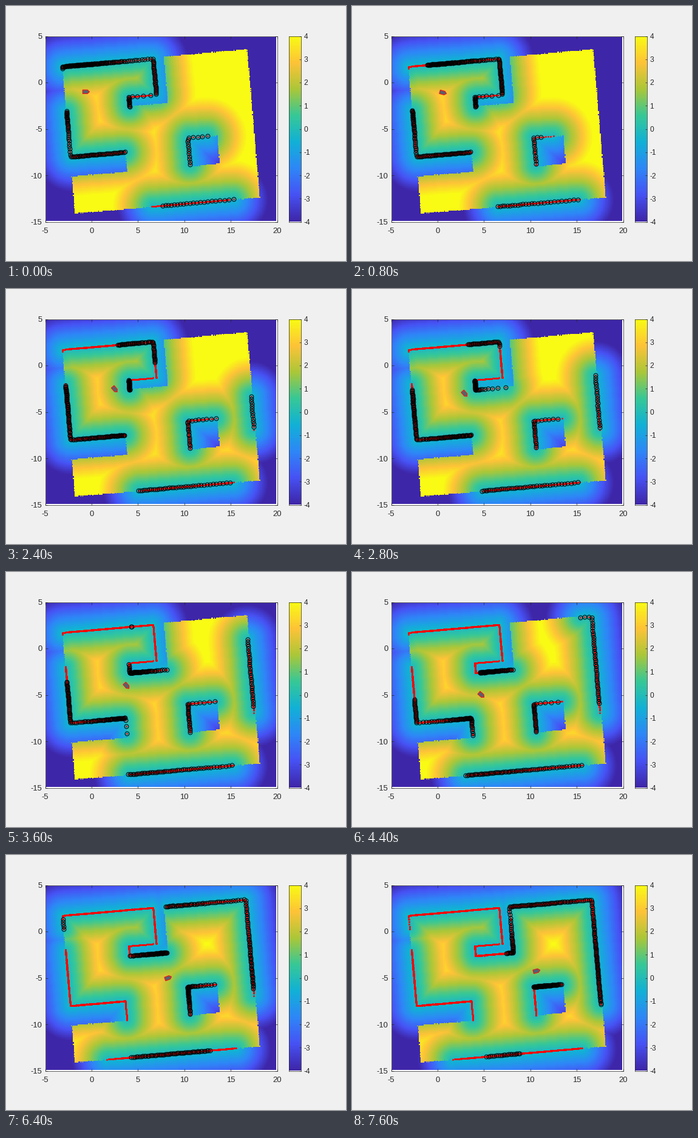
Write a matplotlib script that moves like this. It is 560x420 px and loops after 8000 ms.

```python
import numpy as np
import matplotlib.pyplot as plt
from matplotlib.animation import FuncAnimation
from matplotlib.colors import LinearSegmentedColormap
from matplotlib.path import Path

W, H, DPI = 560, 420, 100
PX = 72 / DPI  # points per pixel
FRAMES, INTERVAL = 20, 400
INK = "#262626"
CELL, MARGIN = .1, .1
LIMIT, INSET = 4, .25  # clipping of the field, thickness given to the walls
rng = np.random.default_rng(4)

plt.rcParams["font.family"] = "Liberation Sans"
plt.rcParams["axes.unicode_minus"] = False

PARULA = LinearSegmentedColormap.from_list("parula_like", [
    "#3e26a8", "#4752f4", "#2e87f7", "#12b1d6",
    "#37c897", "#abc739", "#fec338", "#f9fb15"])


def rotation(degrees):
    """Matrix that turns row vectors counterclockwise."""
    c, s = np.cos(np.radians(degrees)), np.sin(np.radians(degrees))
    return np.array([(c, s), (-s, c)])


TILT = rotation(5)


def rectilinear(us, vs):
    """Tilted outline of alternating horizontal and vertical sides."""
    corners = [(u, v) for pair in zip(us, np.roll(us, -1), vs)
               for u, v in ((pair[0], pair[2]), (pair[1], pair[2]))]
    return np.array(corners) @ TILT


# Floor plan for the field, and the slightly smaller one the laser measures
FREE = rectilinear([-3, 7, 4, 8, 17, -3, 3], [2, -2, -3, 2, -14, -10, -8]) + (0, .1)
BLOCK = rectilinear([10, 13], [-7, -10]) + (0, .1)
SHRINK = .99
WALLS = [SHRINK * rectilinear([-3, 6.9, 3.9, 8, 17, -3, 3],
                              [2, -1.93, -3, 2, -14, -10, -7.85]),
         SHRINK * rectilinear([9.9, 13], [-6.9, -10])]
STARTS = np.vstack(WALLS)
EDGES = np.vstack([np.roll(w, -1, 0) for w in WALLS]) - STARTS


def drive(start=(-.6, -1.0), steps=100):
    """Steer along a heading profile at rising speed; one pose per frame."""
    t = np.arange((FRAMES - 1) * steps + 1) / steps
    heading = np.interp(t, [.8, 4, 5.5, 9.5, 11, 14, 16, 19],
                        [0, -41, -49, -49, -41, 14.5, 20, 14.5])
    speed = .6 + .23 * (t / 17)**2
    a = np.radians(heading)
    velocity = speed[:, None] * np.column_stack([np.cos(a), np.sin(a)])
    travel = np.cumsum(velocity, axis=0) / steps
    xy = np.array(start) + travel - travel[0]
    return xy[::steps], heading[::steps]


def scan(xy, heading):
    """Laser hits over 270 degrees in 1 degree steps."""
    ang = np.radians(heading + np.arange(-135, 136))
    d = np.column_stack([np.cos(ang), np.sin(ang)])
    rel = STARTS - xy
    cross = d[:, :1] * EDGES[:, 1] - d[:, 1:] * EDGES[:, 0]
    r = (rel[:, 0] * EDGES[:, 1] - rel[:, 1] * EDGES[:, 0]) / cross
    u = (rel[:, 0] * d[:, 1:] - rel[:, 1] * d[:, :1]) / cross
    dist = np.where((r > 0) & (u >= 0) & (u <= 1), r, np.inf).min(axis=1)
    dist = dist + rng.normal(0, .012, len(dist))
    return xy + d * dist[:, None]


def wall_points(u0, u1, v):
    """Points already mapped along a tilted horizontal wall."""
    u = np.arange(u0, u1, .12)
    return np.column_stack([u, np.full(len(u), v)]) @ TILT


gx, gy = np.meshgrid(np.arange(-5 + MARGIN + CELL / 2, 20 - MARGIN, CELL),
                     np.arange(-15 + MARGIN + CELL / 2, 5 - MARGIN, CELL))
rough = np.column_stack([(gx + rng.uniform(-.04, .04, (gx.shape[0], 1))).ravel(),
                         (gy + rng.uniform(-.04, .04, (1, gx.shape[1]))).ravel()])
inside = Path(FREE).contains_points(rough) & ~Path(BLOCK).contains_points(rough)
sign = np.where(inside, 1, -1).reshape(gx.shape)


def build_history():
    nearest = np.full(gx.shape, (LIMIT + 1.0)**2)
    known, points, history = set(), [], []

    def add(pts):
        points.append(pts)
        for cell in {tuple(c) for c in np.rint(pts / CELL).astype(int)} - known:
            known.add(cell)
            np.minimum(nearest, (gx - cell[0] * CELL)**2
                       + (gy - cell[1] * CELL)**2, out=nearest)

    add(wall_points(5.3, 13.6, -14 * SHRINK))
    add(wall_points(3.9, 6.4, -1.93 * SHRINK))
    for xy, heading in zip(*drive()):
        hits = scan(xy, heading)
        add(hits)
        history.append((sign * np.sqrt(nearest) - INSET, np.vstack(points),
                        hits, xy, heading))
    return history


HISTORY = build_history()

fig = plt.figure(figsize=(W / DPI, H / DPI), dpi=DPI, facecolor="#f0f0f0")


def pixel_axes(left, top, right, bottom):
    ax = fig.add_axes([left / W, 1 - bottom / H, (right - left) / W, (bottom - top) / H])
    for spine in ax.spines.values():
        spine.set(color=INK, linewidth=.7 * PX)
    return ax


ax = pixel_axes(64.5, 49.5, 446.5, 355.5)
image = ax.imshow(HISTORY[0][0], cmap=PARULA, vmin=-LIMIT, vmax=LIMIT, origin="lower",
                  extent=(-5 + MARGIN, 20 - MARGIN, -15 + MARGIN, 5 - MARGIN),
                  aspect="auto", interpolation="nearest")
ax.set(xlim=(-5, 20), ylim=(-15, 5),
       xticks=range(-5, 21, 5), yticks=range(-15, 6, 5))
ax.tick_params(direction="in", top=True, right=True, length=4 * PX, width=.7 * PX,
               color=INK, labelcolor=INK, labelsize=13 * PX, pad=5 * PX)
ax.tick_params(axis="x", pad=9 * PX)

bar = pixel_axes(465.5, 49.5, 485.5, 355.5)
bar.imshow(np.linspace(-LIMIT, LIMIT, 256)[:, None], cmap=PARULA, origin="lower",
           extent=(0, 1, -LIMIT, LIMIT), aspect="auto")
bar.set(xticks=[], yticks=range(-LIMIT, LIMIT + 1))
bar.yaxis.tick_right()
bar.tick_params(direction="in", length=3 * PX, width=.7 * PX, color=INK,
                labelcolor=INK, labelsize=12 * PX, pad=5 * PX)

mapped, = ax.plot([], [], "o", color="red", ms=2.8 * PX, mew=0)
circles, = ax.plot([], [], "o", mfc="none", mec="black", ms=6.8 * PX, mew=1 * PX)
robot, = ax.fill([0, 1, 1], [0, 0, 1], fc="#56616e", ec="#f01818", lw=1.2 * PX, zorder=5)
BODY = np.array([(-.36, -.2), (.16, -.2), (.38, 0), (.16, .2), (-.36, .2)])


def draw(i):
    field, points, hits, xy, heading = HISTORY[i]
    image.set_data(field)
    mapped.set_data(points[:, 0], points[:, 1])
    circles.set_data(hits[:, 0], hits[:, 1])
    robot.set_xy(BODY @ rotation(heading) + xy)
    return image, mapped, circles, robot


anim = FuncAnimation(fig, draw, frames=FRAMES, interval=INTERVAL,
                     repeat=True, repeat_delay=0)
plt.show()
```
